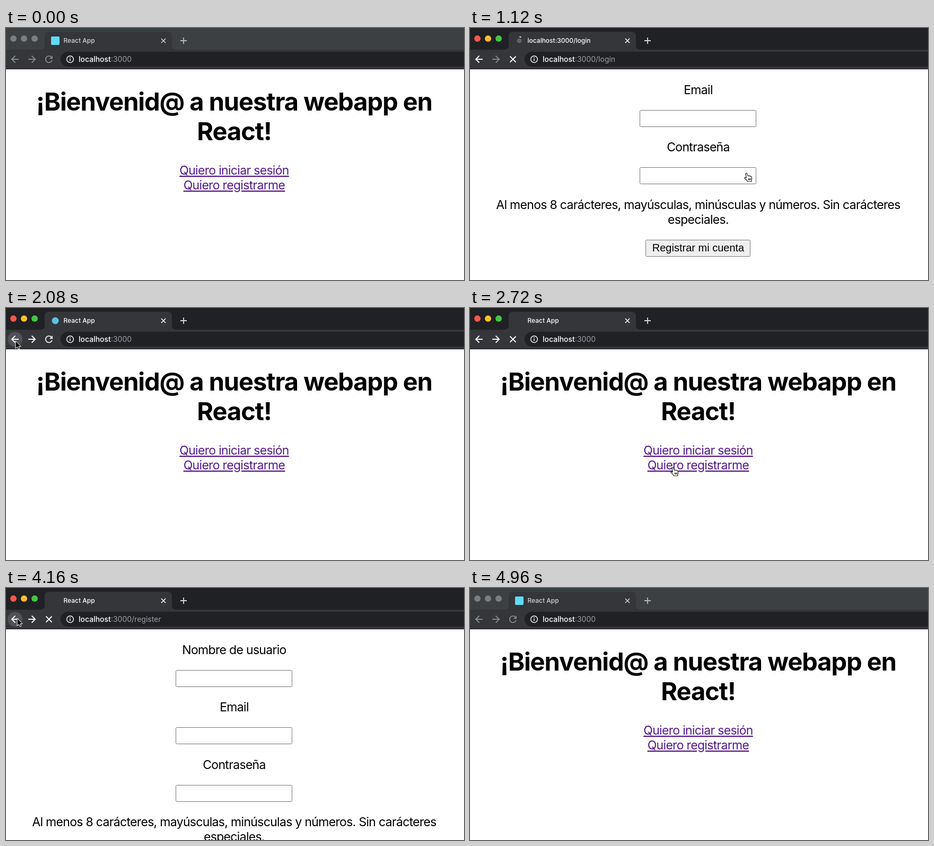
Recreate the animation shown at these times as an HTML page. Size 864x476 px, loop 5120 ms.

```html
<!DOCTYPE html>
<html lang="es">
<head>
<meta charset="utf-8">
<title>React App</title>
<style>
  html, body { margin: 0; width: 100%; height: 100%; overflow: hidden; background: #fff; }
  svg { display: block; }
  text { font-family: Inter, "Open Sans", sans-serif; white-space: pre; }
  .page text { font-size: 23px; letter-spacing: -.68px; text-anchor: middle; }
  .page .title { font-size: 47px; font-weight: 700; letter-spacing: -1.06px; }
  .page .link { fill: #551a8b; text-decoration: underline; }
  .page .button { font: 20px "Liberation Sans", Arial, sans-serif; letter-spacing: 0; }
  .tab { font-size: 12px; font-weight: 500; }
  .url { font-size: 14px; }
  .line { fill: none; stroke-width: 2; }
</style>
</head>
<body>
<svg id="stage" width="864" height="476" viewBox="0 0 864 476"></svg>
<script>
const STEP = 160, STEPS = 32, MID = 430.5;
const stage = document.getElementById('stage');

const between = (n, a, b) => n >= a && n <= b;
const line = (d, color, width = 2) =>
  `<path class="line" d="${d}" stroke="${color}" style="stroke-width:${width}"/>`;
const label = (s, y, cls = '') => `<text class="${cls}" x="${MID}" y="${y}">${s}</text>`;
const box = (x, y, w, fill) =>
  `<rect x="${x + .5}" y="${y + .5}" width="${w - 1}" height="31" rx="2" fill="${fill}" stroke="#767676"/>`;

// Form pages: labelled inputs, then the password hint and the button
function form(names) {
  const rows = names.map((name, i) => {
    const dy = Math.floor(i * 108.5);
    return label(name, 125 + dy) + box(320, 155 + dy, 220, '#fff');
  });
  const y = Math.floor(125 + names.length * 108.5);
  return rows.join('') +
    label('Al menos 8 carácteres, mayúsculas, minúsculas y números. Sin carácteres', y) +
    label('especiales.', y + 28) +
    box(331, y + 58, 198, '#efefef') +
    label('Registrar mi cuenta', y + 80, 'button');
}

const pages = {
  '': label('¡Bienvenid@ a nuestra webapp en', 156, 'title') + label('React!', 212, 'title') +
      label('Quiero iniciar sesión', 277, 'link') + label('Quiero registrarme', 305, 'link'),
  '/login': form(['Email', 'Contraseña']),
  '/register': form(['Nombre de usuario', 'Email', 'Contraseña'])
};

function route(n) {
  if (between(n, 7, 12)) return '/login';
  return between(n, 18, 26) ? '/register' : '';
}

function favicon(n) {
  if ([6, 12, 17, 26].includes(n)) return '';
  if (n === 7) return '<circle cx="93" cy="24" r="4.5" fill="#606266"/>' + line('M93 17Q95 15.5 96.5 18', '#eee', 1.5);
  if ([8, 13, 18, 27].includes(n)) return '<circle cx="93" cy="24" r="6.5" fill="#58c4e3"/>';
  return '<rect x="85" y="16" width="16" height="16" rx="2" fill="#61dafb"/>';
}

function chrome(n, path) {
  const active = between(n, 1, 30);
  const icon = active ? '#f1f3f4' : '#87898c', dim = '#808285';
  const forward = between(n, 12, 17) || between(n, 26, 30);
  const loading = [6, 7, 12, 17, 26].includes(n);
  const hover = between(n, 12, 13) || between(n, 25, 27);
  const lights = active ? ['#f9554e', '#fabd2f', '#3fc844'] : Array(3).fill('#7b7d80');
  const tabInk = active ? '#fff' : '#d0d2d4', plus = active ? '#d5d7da' : '#b9bbbe';
  const title = n === 7 ? 'localhost:3000/login' : 'React App';

  return `<rect width="864" height="41" fill="${active ? '#202124' : '#3c4043'}"/>
    <rect y="41" width="864" height="36" fill="#35363a"/>
    <rect y="77" width="864" height="1" fill="#202124"/>
    <path d="M65 41Q73 41 73 33V15Q73 7 81 7H305Q313 7 313 15V33Q313 41 321 41Z" fill="#35363a"/>` +
    lights.map((c, i) => `<circle cx="${14 + 20 * i}" cy="20" r="6" fill="${c}"/>`).join('') +
    favicon(n) +
    `<text class="tab" x="108.5" y="28" fill="${tabInk}">${title}</text>` +
    line('M293 20l8 8M301 20l-8 8', tabInk, 1.6) +
    line('M329 24h12M335 18v12', plus, 1.8) +
    (hover ? '<circle cx="17" cy="59" r="14" fill="#505155"/>' : '') +
    line('M24 59H11M17.5 52.5L11 59L17.5 65.5', icon) +
    line('M42 59H55M48.5 52.5L55 59L48.5 65.5', forward ? icon : dim) +
    (loading
      ? line('M75.5 53.5l11 11M86.5 53.5l-11 11', icon)
      : `<path transform="translate(70.5 48.5) scale(.875)" fill="${icon}" d="M17.65 6.35C16.2 4.9 14.21 4 12 4c-4.42 0-8 3.58-8 8s3.58 8 8 8c3.73 0 6.84-2.55 7.73-6h-2.08c-.82 2.33-3.04 4-5.65 4-3.31 0-6-2.69-6-6s2.69-6 6-6c1.66 0 3.14.69 4.22 1.78L13 11h7V4z"/>`) +
    `<rect x="103" y="45" width="790" height="28" rx="14" fill="#202124"/>
    <circle class="line" cx="121" cy="59" r="6.3" stroke="#f1f3f4" style="stroke-width:1.5"/>` +
    line('M121 58v4.2M121 55.2v1.6', '#f1f3f4', 1.6) +
    `<text class="url" x="137" y="64" fill="#9aa0a6"><tspan fill="#fff" font-weight="500">localhost</tspan>:3000${path}</text>`;
}

// Pointer stops: step, x, y
const stops = [
  [1, 552, 396], [2, 545, 365], [5, 522, 274], [10, 522, 274], [12, 18, 62], [13, 18, 62],
  [16, 383, 301], [20, 383, 301], [24, 33, 60], [25, 21, 57], [28, 21, 57]
];

const shapes = {
  arrow: `<path d="M0 0V14.5L3.3 11.4L5.4 16L7.8 15L5.8 10.6H10.2Z" fill="#000" stroke="#fff"/>`,
  hand: `<g transform="translate(-5)" stroke="#222" stroke-width="1.2" stroke-linejoin="round">
    <path fill="#fff" d="M3 1.2C3.8-.3 5.2-.2 5.8 1.2L7.6 5.6C8.4 4.8 9.4 5 9.9 5.8C10.8 5.1 11.8 5.4 12.2 6.3C13.3 5.9 14.2 6.5 14.4 7.6C14.9 10 15 12 13.8 14.4V16H6.6C5.6 13.6 3.6 12 1.4 10.2C.3 9.2 1.2 7.7 2.8 8.2L4.4 9.2Z"/>
    <path d="M8.3 10l.5 3.5M10.4 10v3.5M12.4 9.8v3.5"/></g>`,
  beam: line('M-3-8Q0-8 0-6Q0-8 3-8M0-6V6M-3 8Q0 8 0 6Q0 8 3 8', '#222', 1.2)
};

function pointer(n) {
  if (!between(n, 1, 27)) return '';
  const i = stops.findIndex(s => s[0] > n);
  const [a, ax, ay] = stops[i - 1], [b, bx, by] = stops[i];
  const p = (n - a) / (b - a), e = p * p * (3 - 2 * p);
  const kind = between(n, 4, 7) || between(n, 16, 19) ? 'hand' : between(n, 8, 10) ? 'beam' : 'arrow';
  return `<g transform="translate(${ax + (bx - ax) * e} ${ay + (by - ay) * e})">${shapes[kind]}</g>`;
}

let shown = -1;
function draw(now) {
  const n = Math.floor(now / STEP) % STEPS;
  if (n !== shown) {
    const path = route(n);
    stage.innerHTML = `<rect width="864" height="476" fill="#fff"/><g class="page">${pages[path]}</g>` +
      chrome(n, path) + pointer(n);
    shown = n;
  }
  requestAnimationFrame(draw);
}
draw(performance.now());
</script>
</body>
</html>
```
